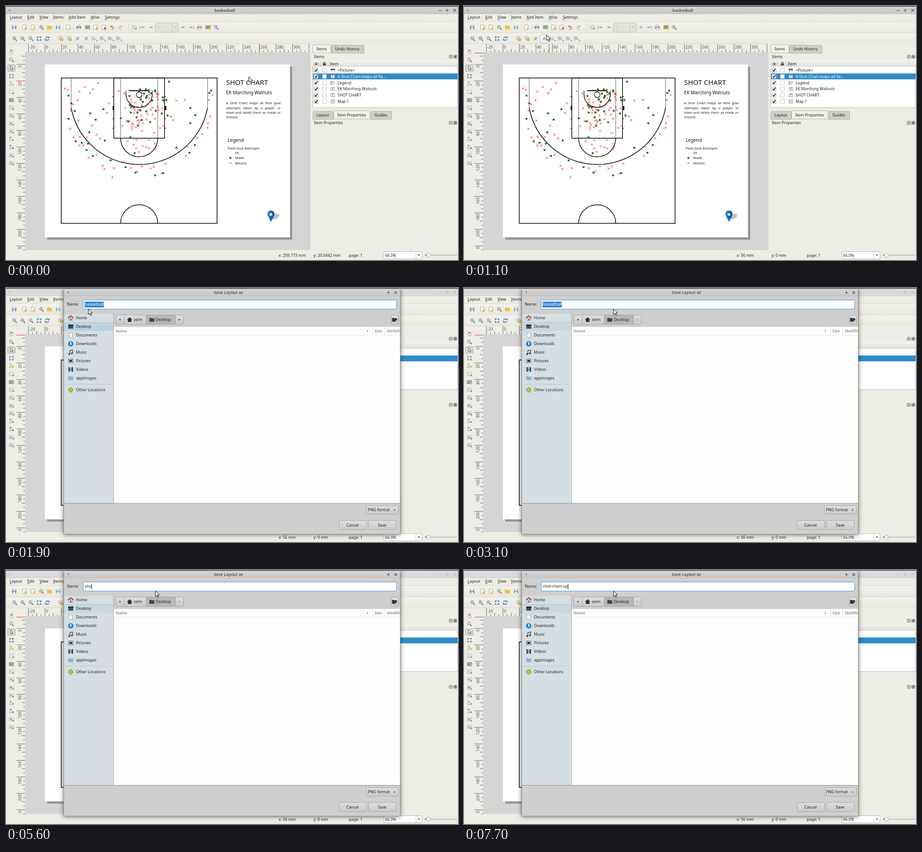
Write an HTML page with a canvas that moves like this. It is 998x561 px and loops after 8000 ms.

```html
<!DOCTYPE html>
<html lang="en">
<head>
<meta charset="utf-8">
<title>Saving a layout</title>
<style>
html, body { margin: 0; width: 100%; height: 100%; overflow: hidden; background: #eeede5; }
canvas { display: block; }
</style>
</head>
<body>
<canvas id="stage" width="998" height="561"></canvas>
<script>
const ctx = document.getElementById('stage').getContext('2d');
const LOOP = 8000, INK = '#222', BLUE = '#308cc6', WINDOW = '#eeede5';
const MM = 1.822, PAGE = { x: 86, y: 129 };

// Held positions: [time, x, y]
const pointer = [
  [-1, 559.3064, 165.5205], [0, 536, 156], [100, 512, 151], [200, 478, 146], [300, 440, 141],
  [500, 372, 132], [600, 305, 122], [700, 246, 113], [900, 205, 108], [1000, 188, 104],
  [1100, 182, 64], [1200, 182, 59], [1300, 182, 52], [1400, 182, 46], [2300, 190, 52],
  [2400, 214, 61], [2500, 250, 66], [2600, 288, 65], [2700, 318, 59], [2800, 330, 53],
  [3000, 330, 50], [3100, 330, 46]];
const typed = [
  [4400, 's'], [4600, 'sh'], [4800, 'sho'], [5000, 'shot'], [5600, 'sho'], [5700, 'shot'],
  [6000, 'shot-'], [6200, 'shot-c'], [6400, 'shot-ch'], [6500, 'shot-cha'], [6600, 'shot-char'],
  [6800, 'shot-chart'], [7300, 'shot-chart-'], [7600, 'shot-chart-u'], [7700, 'shot-chart-up']];
const made = [138,198, 144,215, 138,249, 152,232, 186,237, 215,228, 198,251, 184,279, 218,297, 154,299,
  167,302, 181,304, 178,318, 192,331, 231,341, 264,356, 286,368, 329,374, 347,369, 376,313, 405,324,
  417,307, 407,259, 418,241, 407,225, 449,192, 453,187, 360,167, 284,325, 275,290];
const missed = [130,182, 137,185, 148,217, 143,231, 162,189, 174,179, 203,170, 192,184, 186,192, 158,208,
  227,215, 223,236, 160,253, 190,264, 142,271, 149,290, 163,289, 178,290, 162,308, 171,308, 200,284,
  208,293, 182,335, 200,329, 213,353, 217,360, 235,378, 238,358, 260,345, 276,358, 290,366, 300,354,
  319,359, 326,355, 352,348, 344,370, 397,331, 401,311, 422,292, 433,283, 445,269, 446,259, 451,244,
  448,208, 456,197, 395,207, 376,209, 364,244, 369,252];

let seed = 11;
const random = () => (seed = seed * 16807 % 2147483647) / 2147483647;
const spread = () => random() + random() - 1;
for (let i = 0; i < 36; i++) made.push(303 + spread() * 55, 184 + random() ** 1.5 * 85);
for (let i = 0; i < 60; i++) missed.push(303 + spread() * 55, 187 + random() ** 1.3 * 90);
for (let i = 0; i < 14; i++) missed.push(302 + spread() * 45, 275 + random() * 50);

const heldIndex = (track, t) => track.findLastIndex(key => key[0] <= t);

function rect(x, y, w, h, fill, stroke, radius = 0) {
  ctx.beginPath();
  ctx.roundRect(x, y, w, h, radius);
  if (fill) { ctx.fillStyle = fill; ctx.fill(); }
  if (stroke) { ctx.lineWidth = 1; ctx.strokeStyle = stroke; ctx.stroke(); }
}
function line(points, color = '#000', width = 1) {
  ctx.beginPath();
  for (let i = 0; i < points.length; i += 2) ctx.lineTo(points[i], points[i + 1]);
  ctx.strokeStyle = color; ctx.lineWidth = width; ctx.stroke();
}
function poly(points, fill, stroke) {
  ctx.beginPath();
  for (let i = 0; i < points.length; i += 2) ctx.lineTo(points[i], points[i + 1]);
  ctx.closePath();
  ctx.fillStyle = fill; ctx.fill();
  if (stroke) { ctx.strokeStyle = stroke; ctx.lineWidth = 1; ctx.stroke(); }
}
function arc(x, y, r, from = 0, to = Math.PI * 2, width = 1.5, color = '#000') {
  ctx.beginPath(); ctx.arc(x, y, r, from, to);
  ctx.strokeStyle = color; ctx.lineWidth = width; ctx.stroke();
}
function dot(x, y, r, fill) {
  ctx.beginPath(); ctx.arc(x, y, r, 0, Math.PI * 2); ctx.fillStyle = fill; ctx.fill();
}
// y is the middle of the capitals
function text(s, x, y, size = 8.7, color = INK, weight = 400, align = 'left') {
  ctx.font = `${weight} ${size}px "Noto Sans", sans-serif`;
  ctx.textAlign = align; ctx.fillStyle = color;
  ctx.fillText(s, x, y + size * 0.357);
}
function justified(s, x, y, width, size) {
  text('', 0, 0, size);
  const words = s.split(' ');
  const gap = (width - ctx.measureText(words.join('')).width) / (words.length - 1);
  for (const word of words) { text(word, x, y, size); x += ctx.measureText(word).width + gap; }
}
function vertical(top, bottom, y0, y1) {
  const g = ctx.createLinearGradient(0, y0, 0, y1);
  g.addColorStop(0, top); g.addColorStop(1, bottom);
  return g;
}
const triangle = (x, y, dx, dy, color = '#444') =>
  poly([x + dx, y + dy, x - dx + dy, y - dy + dx, x - dx - dy, y - dy - dx], color);
const cross = (x, y, r, color, width = 1) => {
  line([x - r, y - r, x + r, y + r], color, width);
  line([x + r, y - r, x - r, y + r], color, width);
};
const plus = (x, y, r, color, width = 1.3) => {
  line([x - r, y, x + r, y], color, width);
  line([x, y - r, x, y + r], color, width);
};

const icons = {
  disk(x, y, c) { rect(x - 4.5, y - 4.5, 9, 9, c, null, 1); rect(x - 3, y - 4.5, 6, 4, '#e6eef4'); rect(x - 2.5, y + 1, 5, 3.5, '#f7f7f7'); },
  page(x, y, c) { rect(x - 4.5, y - 5, 8, 10, '#fbfbf8', '#a9a9a4'); rect(x, y, 5, 5, c, null, 1); },
  folder(x, y, c) { rect(x - 5.5, y - 4, 5, 3, c, null, 1); rect(x - 5.5, y - 3, 11, 7.5, c, null, 1); },
  printer(x, y, c) { rect(x - 3, y - 4.5, 6, 4, '#fff', '#aaa'); rect(x - 5.5, y - 2, 11, 5, c, null, 1); rect(x - 3, y + 1, 6, 3.5, '#fff', '#aaa'); },
  picture(x, y, c) { rect(x - 5, y - 4, 10, 7.5, c, '#999'); rect(x - 4.5, y, 9, 3, '#77ad69'); dot(x + 3.5, y + 3, 2.2, '#e4b52e'); },
  undo(x, y, c) { arc(x, y + 1, 3, -2, 2, 1.8, c); triangle(x - 3, y - 2, -2.5, 0, c); },
  redo(x, y, c) { arc(x, y + 1, 3, 1, 5.2, 1.8, c); triangle(x + 3, y - 2, 2.5, 0, c); },
  left(x, y, c) { triangle(x - 2, y, -2.5, 0, c); line([x - 2, y, x + 4, y], c, 2); },
  right(x, y, c) { triangle(x + 2, y, 2.5, 0, c); line([x + 2, y, x - 4, y], c, 2); },
  first(x, y, c) { icons.left(x + 1, y, c); line([x - 5, y - 4, x - 5, y + 4], c, 1.3); },
  last(x, y, c) { icons.right(x - 1, y, c); line([x + 5, y - 4, x + 5, y + 4], c, 1.3); },
  zoom(x, y, c) { line([x + 1.5, y + 1.5, x + 5, y + 5], '#6f6f6c', 1.8); dot(x - 1, y - 1, 3.6, '#edf2f5'); arc(x - 1, y - 1, 3.4, 0, 7, 1, '#77807f'); plus(x - 1, y - 1, 1.8, c, 1.2); },
  full(x, y, c) { for (const dx of [-3, 3]) for (const dy of [-3, 3]) rect(x + dx - 1.8, y + dy - 1.8, 3.6, 3.6, c); rect(x - 2, y - 2, 4, 4, '#f6f6f2'); },
  refresh(x, y, c) { arc(x, y, 3.8, 0.4, 2.8, 2, c); arc(x, y, 3.8, 3.5, 6, 2, c); triangle(x + 4, y - 2, 0, 2, c); triangle(x - 4, y + 2, 0, -2, c); },
  lock(x, y, c) { rect(x - 4.5, y - 4, 7, 6, '#dfe3e5', '#a3a8ab'); rect(x - 1, y, 5.5, 4.5, c, '#b8994a'); },
  group(x, y, c) { rect(x - 3, y - 3, 6, 6, c); line([x - 4.5, y + 4.5, x + 4.5, y - 4.5], '#7f9cb5'); },
  align(x, y, c) { line([x - 4.5, y - 4.5, x - 4.5, y + 4.5], '#888'); rect(x - 3.5, y - 3.5, 5, 2.5, c); rect(x - 3.5, y + 0.5, 8, 2.5, '#a5c2da'); },
  hand(x, y) { rect(x - 3, y - 1.5, 6.5, 6, '#fff', '#8a8a86', 2); for (let i = -2; i < 4; i += 2) line([x + i, y - 5, x + i, y], '#8a8a86'); },
  select(x, y) { poly([x - 2, y - 5, x - 2, y + 4, x, y + 2, x + 2, y + 5, x + 3, y + 4, x + 1, y + 1, x + 4, y + 1], '#fff', '#555'); },
  node(x, y, c) { line([x - 4, y + 4, x - 2, y - 4, x + 4, y + 2, x - 4, y + 4], '#9a9fa3', 1); dot(x - 2, y - 4, 1.5, c); dot(x + 3.5, y + 2, 1.8, c); },
  box(x, y, c) { rect(x - 4.5, y - 4, 9, 7.5, '#f4f6f7', '#a6b3bc'); rect(x - 3, y - 2, 4.5, 3.5, c); rect(x + 2, y + 1, 3.5, 3.5, '#79b168'); }
};
const draw = list => list.split(' ').forEach(item => {
  const [kind, x, y, color] = item.split(',');
  icons[kind](+x, +y, color);
});

function titleBar(x, w, title, active) {
  rect(x, 1, w, 17, vertical(active ? '#d6d6d6' : '#dedede', active ? '#c6c6c6' : '#d7d7d7', 1, 18));
  text(title, x + w / 2 + (x ? -8 : -16), 10, 8.75, active ? '#5b5b5b' : '#b5b5b5', 700, 'center');
  triangle(x + (x ? 10.5 : 8), 10, 0, 1.8, active ? '#666' : '#bbb');
}

function chrome(t) {
  const active = t < 1700, control = active ? '#666' : '#c2c2c2';
  rect(0, 0, 998, 561, WINDOW);
  titleBar(0, 998, 'basketball', active);
  rect(0, 0, 998, 1.5, '#484848');
  line([955, 10, 962, 10], control, 1.4);
  plus(974, 9.5, 3.5, control);
  cross(990.5, 9.5, 3, control, 1.4);
  rect(0, 34, 998, 25, vertical('#f2f1eb', '#e9e8e0', 34, 59));
  rect(0, 60, 998, 23, vertical('#f2f1eb', '#e9e8e0', 60, 83));
  const menu = { Layout: 8, Edit: 47, View: 74, Items: 104, 'Add Item': 138, Atlas: 187, Settings: 218 };
  for (const [name, x] of Object.entries(menu)) {
    text(name, x, 25);
    rect(x, 29.5, ctx.measureText(name[0]).width, 0.8, INK);
  }
  for (const y of [34.5, 59.5, 83.5]) line([0, y, y < 80 ? 998 : 672, y], '#d9d8d1');
  for (const x of [127, 150, 271]) line([x, 39, x, 55], '#d2d1ca');
}

function toolbars(t, x, y) {
  const hoverY = t > 1700 ? 0 : y >= 63 && y < 83 ? 63.5 : y >= 38 && y < 58 ? 38.5 : 0;
  if (hoverY) rect(hoverY > 60 ? 168.5 : 171.5, hoverY, 18, 17, '#f9f9f6', '#bcbbb5', 2);
  rect(329.5, 37.5, 51, 20, '#e3e2dc', '#bfbeb8', 2);
  line([367, 38, 367, 57], '#c8c7c1');
  text('1', 334, 47, 8.7, '#b5b5b0');
  triangle(374, 47, 0, 1.8, '#b5b5b0');
  draw('disk,18,47,#5a81a8 page,41,47,#e8bf3a page,60,47,#efca55 zoom,78,47,#79a06c folder,96,47,#efc143 disk,115,47,#6a9fae page,138,47,#f0d26a ' +
    'printer,161,47,#6d94b8 picture,180,47,#7fb0d8 page,198,47,#e3b63f page,216,47,#d8685f undo,234,47,#e27d33 redo,253,47,#b9b9b5 ' +
    'box,283,47,#c4c4c0 first,301,47,#a9a9a5 left,320,47,#a9a9a5 right,391,47,#a9a9a5 last,409,47,#a9a9a5 printer,427,47,#a3a3a0 picture,446,47,#d28f42 zoom,464,47,#6f95bf ' +
    'zoom,19,72,#5688b8 zoom,37,72,#777 zoom,55,72,#999 full,73,72,#5f8bb5 refresh,91,72,#4d8ac2 lock,121,72,#efc64b lock,140,72,#efc64b ' +
    'group,158,72,#a3c4de group,177,72,#a3c4de align,195,72,#ebc751 align,213,72,#7ba6cb align,231,72,#8fb88b align,249,72,#7ba6cb');
  for (const ax of [201, 219, 237, 255]) triangle(ax, 77, 0, 1.2);
  rect(3.5, 129.5, 17, 15, '#d8d7d0', '#aaa9a3', 2);
  draw('hand,12,101 zoom,12,119,#c4c4bf select,12,137 full,12,155,#7398bb node,12,172,#e5a52d box,12,190,#d6dde2 picture,12,208,#7fb0d8 ' +
    'box,12,225,#b1cbe0 box,12,242,#e5a52d box,12,260,#888 box,12,277,#80b872 node,12,294,#65a353 node,12,312,#4c7eaf box,12,330,#7ba6cb box,12,347,#7eb0d7');
}

function rulers(marker) {
  rect(23, 84, 649, 18, WINDOW);
  rect(23, 84, 19, 455, WINDOW);
  rect(42, 102, 630, 437, '#d5d5d5');
  const step = 5 * MM;
  ctx.save();
  ctx.beginPath(); ctx.rect(42, 84, 629, 18); ctx.clip();
  for (let i = -4; i <= 64; i++) {
    const x = PAGE.x + i * step;
    line([x, i % 4 ? (i % 2 ? 98 : 95) : 84, x, 102], '#555', 0.9);
    if (i % 4 === 0) text(i * 5, x + 2, 91, 8.7, '#555');
  }
  ctx.restore();
  for (let i = -2; i <= 89; i++) {
    const y = PAGE.y + i * step;
    if (y > 539) break;
    line([i % 4 ? (i % 2 ? 38 : 35) : 23, y, 42, y], '#555', 0.9);
    if (i % 4) continue;
    ctx.save();
    ctx.translate(31, y + 2); ctx.rotate(-Math.PI / 2);
    text((i * 5) % 220, 0, 0, 8.7, '#555', 400, 'right');
    ctx.restore();
  }
  line([marker[1], 84, marker[1], 102], '#e03030');
  line([23, marker[2], 42, marker[2]], '#e03030');
}

function shot(x, y, good) {
  if (!good) return cross(x, y, 2.3, '#ea2b2b', 0.95);
  dot(x, y, 2.3, '#1d4d1d');
  dot(x, y, 1.5, '#32893a');
}

function court() {
  ctx.lineWidth = 1.5; ctx.strokeStyle = '#000';
  ctx.strokeRect(122, 159, 344, 321);
  ctx.strokeRect(238, 159, 112, 133);
  for (const x of [253, 335]) line([x, 159, x, 292], '#555');
  for (const x of [144, 445]) line([x, 159, x, 225], '#555');
  const open = Math.asin(28 / 153.1);
  arc(294.5, 197, 153.1, open, Math.PI - open);
  arc(294, 292, 41, 0, Math.PI);
  arc(294, 480, 41, Math.PI, 0);
  arc(294, 195, 29, 0, Math.PI);
  line([265, 196, 265, 187], '#000', 1.2);
  line([323, 196, 323, 187], '#000', 1.2);
  line([272, 187, 315, 187], '#000', 1.8);
  arc(294, 196, 6.3, 0, 7, 1.2);
  line([294, 187, 294, 190], '#000', 1.2);
  for (const x of [235, 350]) {
    rect(x + 0.5, 221, 3.5, 9, '#000');
    for (const y of [200, 249, 270]) line([x, y, x + 3, y], '#000', 1.3);
  }
  for (let i = 0; i < missed.length; i += 2) shot(missed[i], missed[i + 1], false);
  for (let i = 0; i < made.length; i += 2) shot(made[i], made[i + 1], true);
}

function pin() {
  ctx.save();
  ctx.filter = 'blur(1.5px)';
  ctx.beginPath(); ctx.ellipse(594, 465, 10, 5.5, -0.4, 0, 7);
  ctx.fillStyle = '#bbb'; ctx.fill();
  ctx.restore();
  const g = ctx.createLinearGradient(577, 0, 593, 0);
  g.addColorStop(0, '#2b86d6'); g.addColorStop(1, '#07519c');
  ctx.beginPath(); ctx.arc(585, 459.5, 7.8, Math.PI * 0.9, Math.PI * 0.1);
  ctx.quadraticCurveTo(589, 469, 585, 477);
  ctx.quadraticCurveTo(581, 469, 577.6, 462);
  ctx.fillStyle = g; ctx.fill();
  dot(585, 460.3, 2.9, '#e6f1fa');
}

function page() {
  rect(91, 134, 541, 382, '#979797');
  rect(86, 129, 541, 382, '#fff');
  court();
  text('SHOT CHART', 486, 169, 15.3, '#111');
  text('EK Marching Walnuts', 486, 191, 10.2, '#111');
  ['A Shot Chart maps all field goal', 'attempts taken by a player or', 'team and labels them as made or']
    .forEach((s, i) => justified(s, 486, 214.5 + i * 10.4, 120.5, 7.5));
  text('missed.', 486, 245.7, 7.5);
  text('Legend', 489.5, 296, 10.2, '#111');
  text('Field Goal Attempts', 489.5, 314, 7.6);
  text('EK', 506, 324.5, 7.6);
  text('Made', 506, 335.5, 7.6);
  text('Missed', 506, 347, 7.6);
  shot(495.5, 335.5, true);
  shot(495.5, 347, false);
  pin();
}

function tab(name, x, y, w, active) {
  rect(x + 0.5, y + (active ? 0.5 : 1.5), w, 18, active ? '#f2f1ea' : '#cfcec7', '#b3b2ac', [2, 2, 0, 0]);
  text(name, x + 8.5, y + 10);
}

function panels() {
  tab('Items', 677, 85, 40, true);
  tab('Undo History', 718, 85, 72);
  tab('Layout', 677, 231, 45);
  tab('Item Properties', 723, 231, 80, true);
  tab('Guides', 805, 231, 46);
  for (const [name, y] of [['Items', 112], ['Item Properties', 258]]) {
    text(name, 680, y);
    for (const x of [978.5, 988.5]) rect(x, y - 3.5, 7, 7, '#f4f4ef', '#555', 2);
    arc(982, y, 1.6, 0, 7, 0.8, '#444');
    cross(992, y, 2, '#333', 1.2);
  }
  rect(677.5, 121.5, 320, 103, '#fff', '#b9b8b2');
  rect(677, 121, 321, 13.5, vertical('#f3f2ed', '#dddcd6', 121, 135));
  line([694, 122, 694, 134], '#c2c1bb'); line([711, 122, 711, 134], '#c2c1bb');
  text('Item', 715, 128);
  ctx.beginPath(); ctx.ellipse(685, 128, 4.5, 2.7, 0, 0, 7); ctx.strokeStyle = '#777'; ctx.lineWidth = 1; ctx.stroke();
  dot(685, 128, 1.8, '#444');
  arc(703, 126, 2.2, Math.PI, 0, 1.2, '#555'); rect(699.5, 126.5, 7, 5, '#555');
  const team = 'EK Marching Walnuts';
  ['<Picture>', 'A Shot Chart maps all fie...', 'Legend', team, 'SHOT CHART', 'Map 1'].forEach((name, i) => {
    const y = 141.7 + i * 13.85, chosen = i === 1;
    if (chosen) rect(678, 149, 319, 13, BLUE);
    rect(680, y - 4.5, 9, 9, '#fff', '#aaa', 1);
    rect(698.5, y - 4.5, 9, 9, '#fff', '#bbb', 1);
    line([682, y, 684, y + 2.5, 687.5, y - 3], '#111', 1.7);
    if (i === 0) { rect(717, y - 3, 9, 6, '#ddd'); poly([717, y - 3, 726, y - 3, 726, y, 721, y - 1, 717, y + 1], '#444'); }
    else if (i === 2) for (const dy of [-3, 0, 3]) { rect(717, y + dy - 1, 2, 2, '#555'); line([720, y + dy, 726, y + dy], '#888'); }
    else {
      rect(717.5, y - 3.5, 8, 7, i === 5 ? '#ddd' : '#f1f1f1', '#999');
      if (i < 5) text('T', 721.5, y, 6.5, '#444', 400, 'center');
    }
    text(name, 732, y, 8.7, chosen ? '#fff' : INK);
  });
}

function statusBar(marker) {
  const offPage = marker[2] < PAGE.y;
  const mm = v => offPage ? Math.max(0, Math.round(v)) : +v.toPrecision(6);
  text(`x: ${mm((marker[1] - PAGE.x) / MM)} mm`, 602, 550.5);
  text(`y: ${mm((marker[2] - PAGE.y) / MM)} mm`, 679, 550.5);
  text('page: 1', 757, 550.5);
  rect(834.5, 542.5, 84, 16, '#fff', '#b5b4ae', 2);
  line([905, 543, 905, 558], '#ccc');
  text('66.0%', 837, 550.5);
  triangle(911.5, 550.5, 0, 1.9);
  rect(925, 549, 71, 2.5, '#c6c5bf', null, 1);
  rect(925, 549, 6, 2.5, BLUE, null, 1);
  rect(928.5, 546.5, 9, 8, '#f7f7f4', '#aaa', 2);
}

function button(label, x, y, w, h, textX) {
  rect(x + 0.5, y + 0.5, w - 1, h - 1, vertical('#dedede', '#cbcbcb', y, y + h), '#a5a5a5', 2);
  text(label, textX, y + h / 2);
}

function dialogFrame() {
  ctx.save();
  ctx.beginPath(); ctx.rect(0, 0, 998, 561); ctx.rect(127, 1, 744, 542); ctx.clip('evenodd');
  ctx.shadowColor = 'rgba(0,0,0,.55)'; ctx.shadowBlur = 9; ctx.shadowOffsetY = 2;
  rect(127, 1, 744, 542, '#888');
  ctx.restore();
  titleBar(127, 744, 'Save Layout as', true);
  plus(844.5, 10, 3, '#555');
  cross(860.5, 10, 2.7, '#555', 1.4);
  rect(127.5, 1.5, 743, 541.5, null, '#8c8c8c', [3, 3, 0, 0]);
}

function placeIcon(i, x, y) {
  if (i === 0) { rect(x - 4, y - 1, 8, 6, '#f2f2f2', '#777'); rect(x - 1, y + 1, 2.5, 4, '#744'); line([x - 6, y, x, y - 5, x + 6, y], '#b33a2c', 2); }
  else if (i === 1) { rect(x - 5.5, y - 4.5, 11, 9, '#2f5572'); rect(x - 5.5, y - 4.5, 11, 3, '#1d2a33'); }
  else if (i === 2) rect(x - 4, y - 5, 8, 10, '#f5f5f5', '#aaa');
  else if (i === 3) { dot(x, y, 6, '#2e82cb'); line([x, y - 4, x, y], '#fff', 2); triangle(x, y + 1.5, 0, 1.8, '#fff'); }
  else if (i === 4) { line([x - 2, y + 4, x - 2, y - 4, x + 4, y - 5, x + 4, y + 2], '#444', 1.5); dot(x - 3.5, y + 4, 2, '#444'); dot(x + 2.5, y + 2.5, 2, '#444'); }
  else if (i === 5) { rect(x - 5, y - 4, 10, 8, '#ddd', '#555'); rect(x - 3, y - 2, 6, 4, '#222'); }
  else if (i === 6) { rect(x - 5, y - 5, 10, 10, '#333'); rect(x - 2.5, y - 5, 5, 4.5, '#8fb9d6'); rect(x - 2.5, y + 0.5, 5, 4.5, '#8fb9d6'); }
  else if (i === 7) icons.folder(x, y, '#7fb6d5');
  else { plus(x, y, 5.5, '#7b9f1d', 5); plus(x, y, 4.5, '#b4cf3e', 3); }
}

function dialog(t, px, py) {
  const fresh = t < 2000;
  rect(128, 18, 742, 525, '#cfcfcf');
  text('Name:', 134.5, 36);
  rect(170.5, 26.5, 692, 20, '#fff', '#3f92d2', 2);
  const key = heldIndex(typed, t);
  if (key < 0) {
    rect(173.5, 30, 42.5, 13, '#3584d0');
    text('basketball', 174, 36, 8.7, '#fff');
  } else {
    text(typed[key][1], 174, 36);
    rect(174 + ctx.measureText(typed[key][1]).width, 30, 1, 13, '#111');
  }

  rect(128, 57, 109, 418, '#d5dee2');
  if (px < 237 && py >= 57 && py < 76) rect(128, 57, 109, 19, '#dfe7ea');
  rect(128, 76, 109, 18.5, fresh ? vertical('#c3d6e3', '#b9cfdf', 76, 94) : '#ccd7dd');
  line([128, 76.5, 237, 76.5], fresh ? '#a9c2d4' : '#b6c1c7');
  ['Home', 'Desktop', 'Documents', 'Downloads', 'Music', 'Pictures', 'Videos', 'appimages', 'Other Locations'].forEach((name, i) => {
    const y = i < 8 ? 66.3 + i * 18.95 : 225;
    placeIcon(i, 143, y);
    text(name, 154.5, y);
  });
  line([128, 212.5, 237, 212.5], '#b9c3c8');
  line([237.5, 55, 237.5, 475], '#aaa');

  button('', 242, 59, 150, 22, 0);
  const overPath = py >= 59 && px >= 242 && px < 392;
  if (overPath) rect(px < 261 ? 243 : px < 309 ? 262 : 310, 60, px < 261 ? 18 : px < 309 ? 47 : 64, 20, '#dfdfdf');
  if (!overPath || px < 309) rect(310, 60, 64, 20, '#b7b7b7');
  for (const x of [261.5, 309.5, 374.5]) line([x, 59, x, 81], '#a5a5a5');
  triangle(251, 70, -1.8, 0, '#222');
  triangle(383, 70, 1.8, 0, fresh ? '#222' : '#888');
  poly([267, 70, 273, 64.5, 279, 70, 277, 70, 277, 75, 269, 75, 269, 70], '#333');
  text('zelm', 282, 70);
  icons.folder(322, 70, '#444');
  text('Desktop', 330.5, 70);
  button('', 850, 59, 17, 22, 0);
  icons.folder(858, 70, '#333');
  plus(862, 73, 2.2, '#fff', 1);

  rect(238, 86, 632, 389, '#fdfdfb');
  text('Name', 242, 95, 8.5, '#9a9a9a', 700);
  triangle(798, 95.5, 0, 1.8, '#888');
  text('Size', 813.5, 95, 8.5, '#9a9a9a', 700);
  ctx.save();
  ctx.beginPath(); ctx.rect(838, 86, 32.5, 19); ctx.clip();
  text('Modified', 841, 95, 8.5, '#9a9a9a', 700);
  ctx.restore();
  line([238, 104.5, 870, 104.5], '#e6e6e4');
  for (const x of [809.5, 836.5]) line([x, 86, x, 104], '#ddd');
  line([128, 475.5, 870, 475.5], '#8f8f8f');
  button('PNG format', 795, 480, 72, 20, 799);
  triangle(858, 491, 0, 1.8);
  button('Cancel', 735, 513, 62, 21, 751.5);
  button('Save', 800, 513, 62, 21, 821);
}

function cursor(x, y) {
  poly([x, y, x, y + 12.5, x + 2.9, y + 9.8, x + 5, y + 14.6, x + 7, y + 13.7, x + 4.9, y + 9.1, x + 9, y + 9], '#eee', '#111');
}

function render(t) {
  const at = heldIndex(pointer, t);
  const [, x, y] = pointer[at];
  // Ruler marks trail the pointer and stop where it leaves the canvas
  const marker = pointer.slice(0, Math.min(at, 10)).at(-1);
  chrome(t);
  toolbars(t, x, y);
  rulers(marker);
  page();
  panels();
  statusBar(marker);
  if (t >= 1800) dialogFrame();
  if (t >= 1900) dialog(t, x, y);
  cursor(x, y);
}

function frame() {
  render(performance.now() % LOOP);
  requestAnimationFrame(frame);
}
frame();
</script>
</body>
</html>
```
